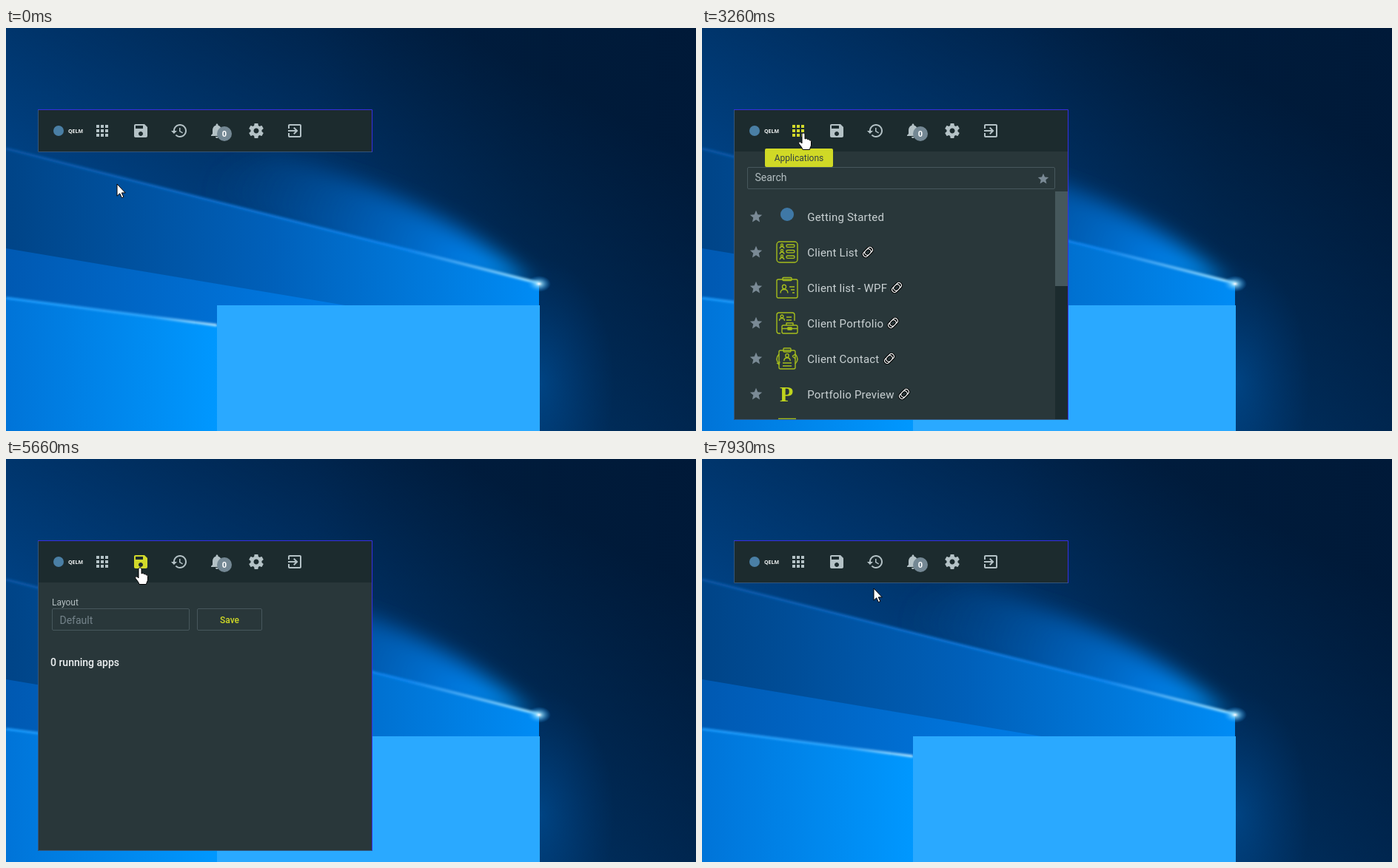
Animation, 932 px wide and 545 px high, one loop 8 s. Source, as an HTML page:

```html
<!DOCTYPE html>
<html lang="en">
<head>
<meta charset="utf-8">
<title>Toolbar</title>
<style>
  html, body { margin: 0; width: 100%; height: 100%; overflow: hidden; background: #002a58; }
  svg { display: block; }
  text { font-family: Roboto, Arial, sans-serif; }
  .row text { font-size: 15px; letter-spacing: .2px; fill: #c9d1d3; }
  .line { fill: none; stroke: #a5bd1c; stroke-width: 1.4; stroke-linejoin: round; }
  .box { fill: none; stroke: #47575c; }
  .star { fill: #7a8a95; }
  .icon { fill: #b4c2c6; }
  .icon.on { fill: #d2d92b; }
  .tip rect { fill: #d0d926; }
  .tip text { font-size: 12px; fill: #334043; text-anchor: middle; }
</style>
</head>
<body>
<svg width="932" height="545" viewBox="0 0 932 545">
  <defs>
    <linearGradient id="base">
      <stop stop-color="#00458a"/><stop offset=".45" stop-color="#004387"/>
      <stop offset=".75" stop-color="#003467"/><stop offset="1" stop-color="#002c5a"/>
    </linearGradient>
    <linearGradient id="shade" x1=".15" y1=".55" x2=".65" y2="0">
      <stop stop-color="#001530" stop-opacity="0"/><stop offset="1" stop-color="#001530" stop-opacity=".8"/>
    </linearGradient>
    <linearGradient id="upper" gradientUnits="userSpaceOnUse" x1="0" x2="720">
      <stop stop-color="#004487"/><stop offset=".5" stop-color="#0060ba"/><stop offset="1" stop-color="#008cf5"/>
    </linearGradient>
    <linearGradient id="middle">
      <stop stop-color="#0059b2"/><stop offset="1" stop-color="#007de8"/>
    </linearGradient>
    <linearGradient id="lower">
      <stop stop-color="#0074d8"/><stop offset="1" stop-color="#0098ff"/>
    </linearGradient>
    <linearGradient id="ray" gradientUnits="userSpaceOnUse" x1="0" x2="720">
      <stop stop-color="#0a5cb0" stop-opacity=".7"/><stop offset=".75" stop-color="#0f86f0"/><stop offset="1" stop-color="#9fe2ff"/>
    </linearGradient>
    <linearGradient id="ray2" gradientUnits="userSpaceOnUse" x1="0" x2="285">
      <stop stop-color="#1c9dff"/><stop offset=".7" stop-color="#35aaff"/><stop offset="1" stop-color="#c5eeff"/>
    </linearGradient>
    <radialGradient id="cone" gradientUnits="userSpaceOnUse" cx="720" cy="345" r="470">
      <stop stop-color="#0c9cff"/><stop offset=".25" stop-color="#0080ec" stop-opacity=".9"/>
      <stop offset=".55" stop-color="#0068c8" stop-opacity=".7"/><stop offset="1" stop-color="#0058ac" stop-opacity="0"/>
    </radialGradient>
    <radialGradient id="glow">
      <stop stop-color="#0078e0" stop-opacity=".6"/><stop offset="1" stop-color="#0060c0" stop-opacity="0"/>
    </radialGradient>
    <radialGradient id="flare">
      <stop stop-color="#fff"/><stop offset=".3" stop-color="#8fdcff" stop-opacity=".7"/>
      <stop offset="1" stop-color="#1a9cff" stop-opacity="0"/>
    </radialGradient>
    <filter id="soft" x="-10%" y="-10%" width="120%" height="120%"><feGaussianBlur stdDeviation="1.5"/></filter>
    <filter id="haze" x="-20%" y="-40%" width="140%" height="180%"><feGaussianBlur stdDeviation="14"/></filter>
  </defs>

  <g id="wallpaper">
    <path fill="url(#base)" d="M0 0H932V545H0z"/>
    <path fill="url(#shade)" d="M0 0H932V545H0z"/>
    <ellipse cx="721" cy="480" rx="100" ry="170" fill="url(#glow)" opacity=".5"/>
    <path fill="url(#cone)" filter="url(#haze)" d="M712 346Q590 232 360 172L200 205 560 335z"/>
    <path fill="url(#upper)" d="M0 163 720 345V378H470L0 298z"/>
    <path fill="url(#middle)" d="M0 298 470 377 285 402 0 365z"/>
    <path fill="url(#lower)" d="M0 365 286 402V545H0z"/>
    <g fill="none" filter="url(#soft)">
      <path stroke="url(#ray)" stroke-width="3.5" d="M0 163 720 345"/>
      <path stroke="url(#ray2)" stroke-width="3" d="M0 365 285 402"/>
    </g>
    <rect x="285" y="375" width="436" height="436" fill="#2aa9ff"/>
    <ellipse cx="720" cy="346" rx="16" ry="11" fill="url(#flare)"/>
  </g>

  <path fill="#1c2b2e" d="M43 110H495V168H43z"/>
  <g id="panel">
    <path fill="#29373a" d="M43 167H495V530H43z"/>
    <g id="apps">
      <path fill="#1c2b2e" d="M477 221H494V529H477z"/>
      <path fill="#46585c" d="M477 221H494V349H477z"/>
      <rect class="box" x="61.5" y="188.5" width="415" height="29" rx="1.5"/>
      <text id="search" fill="#b3bec1">Search</text>
      <path id="caret" stroke="#d5dcde" d="M72.5 196V212"/>
      <g id="rows"></g>
      <path stroke="#a5bd1c" stroke-width="1.4" d="M103 528.4H127"/>
    </g>
    <g id="layout">
      <text x="62" y="198" font-size="12" fill="#b3bec1">Layout</text>
      <rect class="box" x="62.5" y="202.5" width="185" height="29" rx="1.5"/>
      <text x="72.5" y="223" font-size="14" fill="#74838a">Default</text>
      <rect class="box" x="258.5" y="202.5" width="87" height="29" rx="1.5"/>
      <text x="302" y="222" font-size="12" font-weight="500" fill="#d0d926" text-anchor="middle">Save</text>
      <text x="60" y="280" font-size="14" font-weight="500" fill="#eef2f3">0 running apps</text>
    </g>
  </g>
  <g fill="none">
    <path id="sides" stroke="#34557a"/>
    <path id="edge" stroke="#3a2ee0"/>
  </g>

  <circle cx="71" cy="139" r="7" fill="#4a7fa5"/>
  <text x="84" y="142.2" font-size="7" font-weight="700" fill="#f2f5f5" style="font-family:'Open Sans',sans-serif">QELM</text>
  <g id="icons"></g>
  <circle cx="295" cy="143" r="10" fill="#748894"/>
  <text x="295" y="147" font-size="11" font-weight="700" fill="#fff" text-anchor="middle">0</text>

  <g id="tip" class="tip"><rect rx="2"/><text></text></g>
  <path id="cursor" fill="#fff" stroke="#000" stroke-linejoin="round"/>
</svg>
<script>
const $ = id => document.getElementById(id);
const set = (el, attrs) => { for (const k in attrs) el.setAttribute(k, attrs[k]); };

const STAR = 'M12 17.27 18.18 21l-1.64-7.03L22 9.24l-7.19-.61L12 2 9.19 8.63 2 9.24l5.46 4.73L5.82 21z';
const ARROW = 'M0 0v16.2l3.7-3.4 2.7 5.8 2.5-1.1-2.6-5.6h5z';
const HAND = 'M-2 2C-2-.6 2-.6 2 2V8c2-.9 3.4-.3 3.6.8 1.3-.5 2.5 0 2.7 1.1 1.3-.2 2.2.5 2.2 1.7V16c0 2.2-1.6 3.4-2 6.5H-1c-1-3.4-3.2-5.4-5-8-1.2-1.9.6-3.4 2.2-2.2L-2 14z';

// Toolbar glyphs on a 24 px grid, one every 52 px
const glyphs = [
  'M4 4h4v4H4zM10 4h4v4h-4zM16 4h4v4h-4zM4 10h4v4H4zM10 10h4v4h-4zM16 10h4v4h-4zM4 16h4v4H4zM10 16h4v4h-4zM16 16h4v4h-4z',
  'M17 3H5c-1.11 0-2 .9-2 2v14c0 1.1.89 2 2 2h14c1.1 0 2-.9 2-2V7l-4-4zm-5 16c-1.66 0-3-1.34-3-3s1.34-3 3-3 3 1.34 3 3-1.34 3-3 3zm3-10H5V5h10v4z',
  'M13 3c-4.97 0-9 4.03-9 9H1l3.89 3.89.07.14L9 12H6c0-3.87 3.13-7 7-7s7 3.13 7 7-3.13 7-7 7c-1.93 0-3.68-.79-4.94-2.06l-1.42 1.42C8.27 19.99 10.51 21 13 21c4.97 0 9-4.03 9-9s-4.03-9-9-9zm-1 5v5l4.28 2.54.72-1.21-3.5-2.08V8z',
  'M11 22c1.1 0 2-.9 2-2h-4c0 1.1.89 2 2 2zm6-6v-5c0-3.07-1.64-5.64-4.5-6.32V4c0-.83-.67-1.5-1.5-1.5s-1.5.67-1.5 1.5v.68C6.63 5.36 5 7.92 5 11v5l-2 2v1h16v-1z',
  'M19.43 12.98c.04-.32.07-.64.07-.98s-.03-.66-.07-.98l2.11-1.65c.19-.15.24-.42.12-.64l-2-3.46c-.12-.22-.39-.3-.61-.22l-2.49 1c-.52-.4-1.08-.73-1.69-.98l-.38-2.65C14.46 2.18 14.25 2 14 2h-4c-.25 0-.46.18-.49.42l-.38 2.65c-.61.25-1.17.59-1.69.98l-2.49-1c-.23-.09-.49 0-.61.22l-2 3.46c-.13.22-.07.49.12.64l2.11 1.65c-.04.32-.07.65-.07.98s.03.66.07.98l-2.11 1.65c-.19.15-.24.42-.12.64l2 3.46c.12.22.39.3.61.22l2.49-1c.52.4 1.08.73 1.69.98l.38 2.65c.03.24.24.42.49.42h4c.25 0 .46-.18.49-.42l.38-2.65c.61-.25 1.17-.59 1.69-.98l2.49 1c.23.09.49 0 .61-.22l2-3.46c.12-.22.07-.49-.12-.64zM12 15.5c-1.93 0-3.5-1.57-3.5-3.5s1.57-3.5 3.5-3.5 3.5 1.57 3.5 3.5-1.57 3.5-3.5 3.5z',
  'M10.09 15.59 11.5 17l5-5-5-5-1.41 1.41L12.67 11H3v2h9.67zM19 3H5c-1.11 0-2 .9-2 2v4h2V5h14v14H5v-4H3v4c0 1.1.89 2 2 2h14c1.1 0 2-.9 2-2V5c0-1.1-.9-2-2-2z'
];
$('icons').innerHTML = glyphs.map((d, i) =>
  `<path class="icon" fill-rule="evenodd" d="${d}" transform="translate(${118 + 52 * i} 127)"/>`).join('');

// App list
const line = d => `<path class="line" d="${d}"/>`;
const frame = (x, y, w, h, r) => `<rect class="line" x="${x}" y="${y}" width="${w}" height="${h}" rx="${r}"/>`;
const person = (x, y, k = 1) => line(
  `M${x - 1.8 * k} ${y}a${1.8 * k} ${2 * k} 0 1 1 ${3.6 * k} 0a${1.8 * k} ${2 * k} 0 1 1 ${-3.6 * k} 0` +
  `M${x - 3.5 * k} ${y + 6 * k}q0 ${-3.5 * k} ${3.5 * k} ${-3.5 * k}t${3.5 * k} ${3.5 * k}`);
const art = [
  '<circle cx="15" cy="12" r="9" fill="#3f78a6"/>',
  frame(1, 1, 28, 28, 4) + [5.5, 13, 20.5].map(y => person(8, y, .8) + frame(14, y - .5, 11, 3.4, 1.7)).join(''),
  frame(1, 4, 28, 25, 2) + frame(9, 1.5, 12, 4, 1) + person(11, 14, 1.4) + line('M18 14h7M20 18h5M22 22h3'),
  line('M6 29H4q-3 0-3-3V4q0-3 3-3h18q3 0 3 3v8M14 7h7M14 11h7') + person(8, 6) +
    frame(8, 18, 21, 11, 2) + line('M14 18v-3h9v3M8 22.5h21M16 21h5v3h-5z'),
  frame(4, 4, 22, 25, 2) + frame(10, 1, 10, 5, 1) + person(15, 11, 1.2) +
    line('M9 21h12M9 25h12M4 9q-6 7 0 13m-3-1 3 2 1-4M26 9q6 7 0 13M22 12l4-3M22 12l4 3'),
  `<text x="5" y="25" style="font:700 30px 'Liberation Serif',serif;fill:#bfd41d">P</text>`
];
const links = x => `<g fill="none" transform="translate(${x} 0) rotate(-45)">` +
  ['#000" stroke-width="3.4', '#f4f6f6" stroke-width="1.2'].map(s =>
    `<path stroke="${s}" d="M-4-3.5H1a3.5 3.5 0 0 1 0 7H-4a3.5 3.5 0 0 1 0-7zM-1-3.5H4a3.5 3.5 0 0 1 0 7H-1a3.5 3.5 0 0 1 0-7z"/>`).join('') + '</g>';
const star = (x, y, k) => `<path class="star" d="${STAR}" transform="translate(${x - 12 * k} ${y - 12 * k}) scale(${k})"/>`;
const apps = [['Getting Started'], ['Client List', 224], ['Client list - WPF', 263],
  ['Client Portfolio', 258], ['Client Contact', 253], ['Portfolio Preview', 273]];
$('rows').innerHTML = star(461, 204, .72) + apps.map(([name, x], i) =>
  `<g class="row" transform="translate(0 ${255 + 48 * i})">${star(73, 0, .82)}
   <g transform="translate(100 -15)">${art[i]}</g><text x="142.3" y="6">${name}</text>${x ? links(x) : ''}</g>`).join('');

// Timeline
const LOOP = 8000;
const path = [[590, 150, 211], [1060, 136, 142], [3560, 136, 142], [3720, 141, 154], [3800, 143, 160],
  [3890, 145, 180], [3969, 145, 180], [4200, 155, 183], [4560, 180, 147],
  [7759, 180, 147], [7760, 196, 151], [7930, 232, 175]];
const within = (t, a, b) => t >= a && t < b;
const ramp = (t, a, b) => Math.min(1, Math.max(0, (t - a) / (b - a)));

// label, width, icon centre, below the bar?, show from, shown, hide from, hidden
const tips = [
  ['Applications', 92, 130, false, 1060, 1210, 1990, 1990],
  ['Applications', 92, 131, true, 2150, 2400, 3320, 3320],
  ['Applications', 92, 130, false, 3400, 3560, 3720, 3880],
  ['Save Layout', 90, 182, false, 4560, 4720, 5660, 5660],
  ['Save Layout', 90, 183, true, 5820, 6050, 7140, 7140],
  ['Save Layout', 90, 182, false, 7300, 7460, 7760, 7930]
];

function cursorAt(t) {
  const i = path.findIndex(p => p[0] > t);
  if (i < 1) return (i ? path[path.length - 1] : path[0]).slice(1);
  const [a, b] = [path[i - 1], path[i]], f = ramp(t, a[0], b[0]);
  return [a[1] + (b[1] - a[1]) * f, a[2] + (b[2] - a[2]) * f];
}

function placeTip(label, w, x, y, below, k) {
  const [rect, text] = $('tip').children, left = below ? -w / 2 : 0, top = below ? 0 : -12.5;
  set($('tip'), { transform: `translate(${x} ${y}) scale(${k})`, opacity: k });
  set(rect, { x: left, y: top, width: w, height: 25 });
  set(text, { x: left + w / 2, y: top + 17 });
  text.textContent = label;
}

function drawTip(t) {
  const tip = tips.find(p => within(t, p[4], p[7]));
  if (within(t, 1990, 2070)) return placeTip('Applications', 92, 139, 135, false, .19);
  if (!tip) return placeTip('', 0, 0, 0, false, 0);
  const [label, w, x, below, a, b, c, d] = tip;
  const k = ramp(t, a, b) * (d > c ? 1 - ramp(t, c, d) : 1);
  placeTip(label, w, below ? x : x + 29, below ? 163 : 140.5, below, k);
}

function draw(t) {
  const list = within(t, 1990, 3320), save = within(t, 5660, 7140), bottom = list || save ? 529.5 : 167.5;
  const show = (id, on) => set($(id), { display: on ? 'inline' : 'none' });
  show('panel', list || save);
  show('apps', list);
  show('layout', save);
  show('caret', within(t, 1990, 2460) || within(t, 2940, 3090));
  set($('sides'), { d: `M43.5 110V${bottom}H495` });
  set($('edge'), { d: `M43 110.5H494.5V${bottom}` });

  const lift = ramp(t, 1900, 2020) * (1 - ramp(t, 3090, 3250));
  set($('search'), { x: 71.5 - 2 * lift, y: 207 - 12 * lift, 'font-size': 14 - 2 * lift });

  const icons = $('icons').children;
  icons[0].classList.toggle('on', within(t, 970, 3700));
  icons[1].classList.toggle('on', within(t, 4480, 7760));

  const hand = within(t, 1130, 1990) || within(t, 2070, 3560) || within(t, 4800, 7760);
  const [x, y] = cursorAt(t);
  set($('cursor'), { d: hand ? HAND : ARROW, transform: `translate(${hand ? x + 1 : x} ${y})` });
  drawTip(t);
}

function tick(now) {
  draw(now % LOOP);
  requestAnimationFrame(tick);
}
draw(0);
requestAnimationFrame(tick);
</script>
</body>
</html>
```
